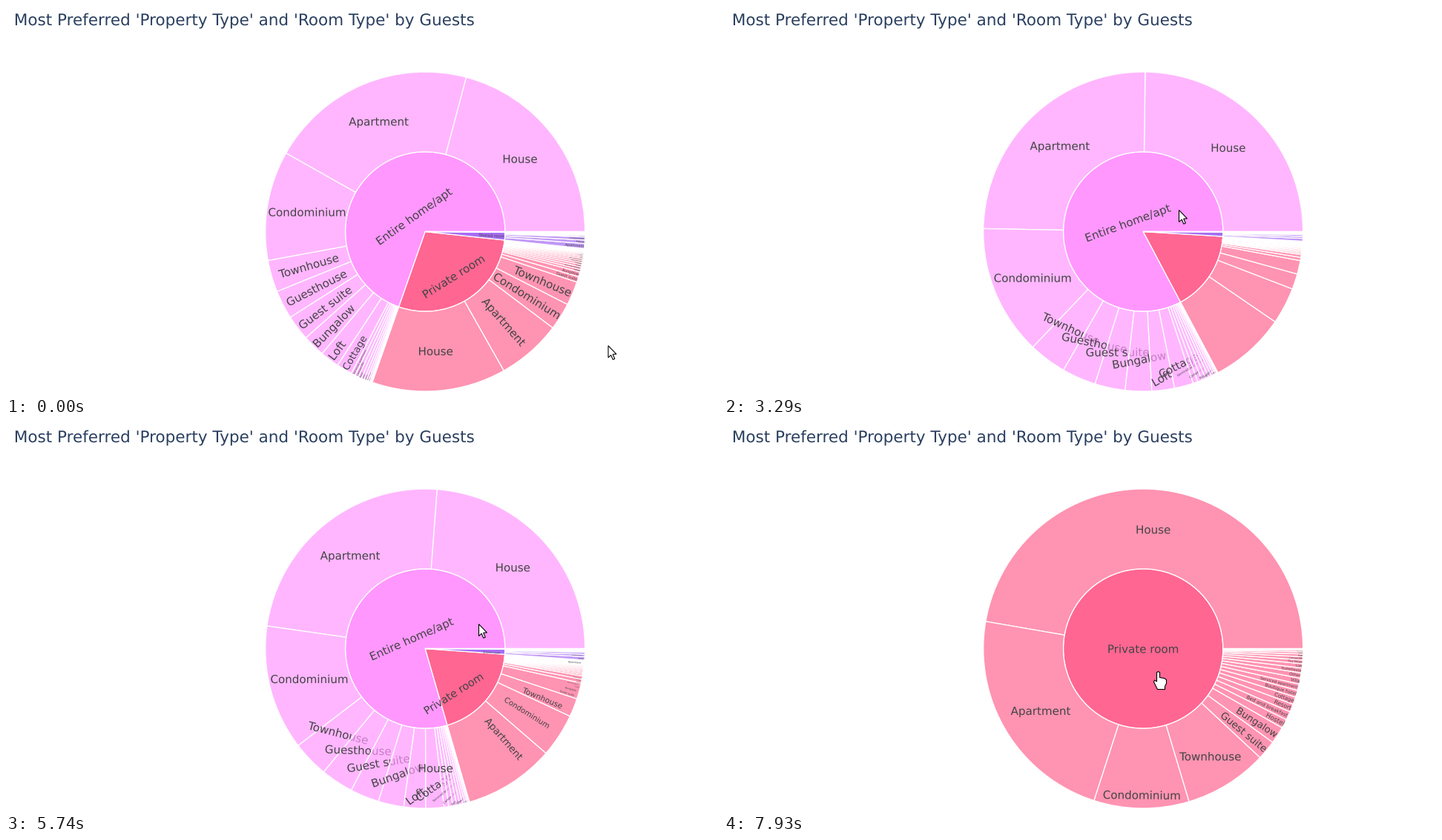
Animation of 960 by 525 pixels, one loop 8000 ms. Source, as a matplotlib script:

```python
import numpy as np
import matplotlib.pyplot as plt
from matplotlib.animation import FuncAnimation
from matplotlib.colors import to_rgba
from matplotlib.patches import Circle, PathPatch, Polygon, Wedge
from matplotlib.textpath import TextPath
from matplotlib.transforms import Affine2D

W, H = 960, 525
STEP, FRAMES = 50, 160
PX = 0.72                      # points per pixel at 100 dpi
CX, CY = 565.2, 304.5
R_IN, R_OUT = 107.7, 215.5
SPIN = 750                     # length of one zoom in ms
PAD = 7.5
LABEL_SIZE, LABEL_H = 15.1, 18.4
DARK = "#444444"
GUESTS = 11924


def ramp(total, n, low=1):
    """Split a total into n parts that fall evenly."""
    parts = np.arange(low + n - 1, low - 1, -1)
    return list(total * parts / parts.sum())


# name, end angle in the overview, colour
ROOTS = [("Entire home/apt", 250.7, "#FF97FF"),
         ("Private room", 353.9, "#FF6692"),
         ("Shared room", 359.5, "#A76CF5"),
         ("Hotel room", 360.0, "#B6E880")]

# leaf names and their shares of the parent in degrees
LEAVES = [
    ("House,Apartment,Condominium,Townhouse,Guesthouse,Guest suite,Bungalow,"
     "Loft,Cottage,Serviced apartment,Camper/RV,Boat,Villa,Other,Tiny house,"
     "Cabin,Resort,Hostel,Bed and breakfast",
     [107.9, 108.3, 57.3] + ramp(74.8, 6, low=5) + ramp(11.7, 10)),
    ("House,Apartment,Condominium,Townhouse,Guest suite,Bungalow,Hostel,"
     "Bed and breakfast,Resort,Cottage,Boutique hotel,Serviced apartment,"
     "Villa,Other,Guesthouse,Loft,Tiny house,Camper/RV,Boat,Cabin,"
     "Farm stay,Hut,Barn",
     [170.2, 81.9, 34.6, 30.3] + ramp(13.3, 2, low=7) + ramp(29.7, 17)),
    ("Apartment,House,Condominium,Townhouse,Guest suite,Hostel,Loft,Other",
     [118, 80, 72] + ramp(90, 5)),
    ("Hostel,Resort,Other", ramp(360, 3)),
]

ALL, ENTIRE, PRIVATE = -1, 0, 1      # views: overview or one root in focus
# click, start of the turn, view before, view after
ZOOMS = [(2820, 2966, ALL, ENTIRE), (5040, 5233, ENTIRE, ALL),
         (6970, 7074, ALL, PRIVATE)]

# start, end and goal of each pointer move
HOME_POS = (812, 458)
MOVES = [(70, 190, 817, 454), (990, 1540, 712, 255), (1940, 2230, 610, 283),
         (2430, 2490, 613.5, 275), (3900, 4240, 650, 235),
         (4500, 4710, 637.5, 271), (5880, 6010, 638, 309),
         (6010, 6310, 585.5, 335)]

ARROW = [(0, 0), (0, 16), (3.7, 12.6), (6.3, 18.7), (8.8, 17.6), (6.2, 11.6),
         (11, 11.4)]
HAND = [(-2, 1), (0, 0), (2, 1), (2, 8), (8, 9), (11, 11), (11, 16), (9, 20),
        (9, 24), (-1, 24), (-6, 14), (-5, 11.5), (-2, 13.5)]

fig = plt.figure(figsize=(W / 100, H / 100), dpi=100, facecolor="white")
ax = fig.add_axes([0, 0, 1, 1])
ax.set_xlim(0, W)
ax.set_ylim(H, 0)
ax.axis("off")


def glyphs(text, size, family="DejaVu Sans"):
    return TextPath((0, 0), text, size=size, prop={"family": family})


def add_text(path, color, x=0, y=0):
    place = Affine2D().scale(1, -1).translate(x, y)
    return ax.add_patch(PathPatch(path, fc=color, lw=0,
                                  transform=place + ax.transData))


def polar(deg, r):
    ang = np.radians(deg)
    return CX + r * np.cos(ang), CY - r * np.sin(ang)


def upright(deg):
    return (deg + 90) % 180 - 90


def inscribed(half, ring):
    """Radius of the largest circle in a slice, relative to its outer radius."""
    if half > np.pi - 1e-3:
        return 1.0
    return min(1 / (1 + 1 / np.sin(half)), ring / 2)


def half_size(aspect, half, ring):
    q = aspect + 1 / (2 * np.tan(half))
    return min(1 / (np.sqrt(q * q + 0.5) + q),
               ring / (np.sqrt(aspect ** 2 + ring / 2) + aspect))


def fit_label(width, lo, hi, r, ring):
    """Angle, scale, distance from the centre and rotation for a label."""
    mid, half = (lo + hi) / 2, np.radians(hi - lo) / 2
    inner = inscribed(half, ring)
    scale = 2 * inner * r / np.hypot(width, LABEL_H)
    if scale >= 1:
        return np.array([mid, scale, (1 - inner) * r, 0])
    options = []
    for long, short, turn in ((LABEL_H, width, 0), (width, LABEL_H, 90)):
        aspect = short / long
        s = half_size(aspect, half, ring)
        options.append((2 * s * (r - PAD) / long,
                        (np.cos(s) - aspect * s) * r, upright(mid - turn)))
    return np.array([mid, *max(options)])


def root_span(k, view):
    if view == ALL:
        return (ROOTS[k - 1][1] if k else 0.0), ROOTS[k][1]
    return (0.0 if k <= view else 360.0), (0.0 if k < view else 360.0)


class Slice:
    def __init__(self, name, root, part, leaf):
        self.name, self.root, self.leaf = name, root, leaf
        self.r, self.ring = (R_OUT, 0.5) if leaf else (R_IN, 1)
        self.wedge = ax.add_patch(Wedge(
            (CX, CY), self.r, 0, 1, width=R_OUT - R_IN if leaf else None,
            fc=to_rgba(ROOTS[root][2], 0.7 if leaf else 1), ec="white",
            lw=1.3 * PX))
        path = glyphs(name, LABEL_SIZE)
        box = path.get_extents()
        self.shift = Affine2D().translate(-(box.x0 + box.x1) / 2,
                                          -0.385 * LABEL_SIZE)
        self.label = add_text(path, DARK)
        self.spans, self.fits = {}, {}
        for view in (ALL, ENTIRE, PRIVATE):
            lo, hi = root_span(root, view)
            span = lo + (hi - lo) * np.array(part) / 360
            self.spans[view] = span
            if hi > lo:
                self.fits[view] = fit_label(box.width, *span, self.r, self.ring)
        lo, hi = self.spans[ALL]
        self.count = round(GUESTS * (hi - lo) / 360)

    def contains(self, deg, dist, view):
        lo, hi = self.spans[view]
        inner = R_IN if self.leaf else 0
        return lo <= deg < hi and inner <= dist < self.r

    def update(self, a, b, p):
        lo, hi = self.spans[a] + (self.spans[b] - self.spans[a]) * p
        self.wedge.set_visible(hi - lo > 1e-4)
        self.wedge.set_theta1(-hi)
        self.wedge.set_theta2(-lo)
        self.place_label(a, b, p)

    def place_label(self, a, b, p):
        self.label.set_visible(False)
        if b not in self.fits:
            return
        new = self.fits[b]
        if a in self.fits:
            old = self.fits[a]
            mid, scale, dist, rot = old + (new - old) * p
            # hold the distance longer near a full circle
            power = 3 if new[2] == 0 else 1 / 3 if old[2] == 0 else 1
            dist = old[2] + (new[2] - old[2]) * p ** power
        else:
            mid, scale, dist, rot = new
            scale *= p
        scale = min(scale, 1)
        if scale * LABEL_SIZE < 1.3:
            return
        place = self.shift + Affine2D().scale(scale, -scale).rotate_deg(
            -rot).translate(*polar(mid, dist))
        self.label.set_transform(place + ax.transData)
        self.label.set_visible(True)


class Hover:
    def __init__(self, piece, view):
        x, y, side = self.anchor(piece, view)
        room, _, color = ROOTS[piece.root]
        parent = room if piece.leaf else ""
        name = f"{parent}/{piece.name}" if parent else piece.name
        lines = [f"labels={piece.name}", f"count={piece.count}",
                 f"parent={parent}", f"id={name}", f"room_type={room}"]
        paths = [glyphs(s, 16.25, "Liberation Sans") for s in lines]
        width = max(p.get_extents().x1 for p in paths) + 9
        near, far = x + 7 * side, x + (7 + width) * side
        shape = [(x, y), (near, y - 7.5), (near, y - 55), (far, y - 55),
                 (far, y + 55), (near, y + 55), (near, y + 7.5)]
        self.parts = [ax.add_patch(Polygon(shape, fc=color, ec=DARK,
                                           lw=1.25 * PX))]
        left = min(near, far) + 4
        for i, path in enumerate(paths):
            self.parts.append(add_text(path, DARK, left, y - 36 + 21.15 * i))

    @staticmethod
    def anchor(piece, view):
        """Side of the inscribed circle, or the rim of a very wide slice."""
        lo, hi = piece.spans[view]
        wide = 180 < hi - lo < 360
        inner = 0 if wide else inscribed(np.radians(hi - lo) / 2, piece.ring)
        mid = (lo + hi) / 2
        side = 1 if np.cos(np.radians(mid)) > 0 else -1
        x, y = polar(mid, (1 - inner) * piece.r)
        return x + side * inner * piece.r, y, side

    def show(self, shown):
        for part in self.parts:
            part.set_visible(shown)


def frame_time(i):
    return i * STEP + 40


def zoom_state(t):
    state = ALL, ALL, 1.0
    for _, start, a, b in ZOOMS:
        if t >= start:
            state = a, b, min((t - start) / SPIN, 1.0)
    return state


def pointer_at(t):
    pos = np.array(HOME_POS, float)
    for start, end, x, y in MOVES:
        p = np.clip((t - start) / (end - start), 0, 1)
        pos += (np.array((x, y)) - pos) * p
    return pos


def slice_under(pos, view):
    dx, dy = pos[0] - CX, CY - pos[1]
    deg, dist = np.degrees(np.arctan2(dy, dx)) % 360, np.hypot(dx, dy)
    for piece in slices:
        if piece.contains(deg, dist, view):
            return piece
    return None


def plan_hovers():
    """Hover box for each frame; a clicked slice is mute until it is left."""
    boxes, plan, muted = {}, [], None
    for i in range(FRAMES):
        t = frame_time(i)
        _, view, p = zoom_state(t)
        piece = slice_under(pointer_at(t), view)
        if p < 1:
            muted = slices[ENTIRE] if view != PRIVATE else slices[PRIVATE]
        elif piece is not muted:
            muted = None
        if p < 1 or piece is None or piece is muted:
            plan.append(None)
            continue
        key = piece, view
        if key not in boxes:
            boxes[key] = Hover(piece, view)
        plan.append(boxes[key])
    return list(boxes.values()), plan


add_text(glyphs("Most Preferred 'Property Type' and 'Room Type' by Guests", 21.52),
         "#2a3f5f", 10.8, 26)

slices = [Slice(root[0], k, (0, 360), False) for k, root in enumerate(ROOTS)]
for k, (names, shares) in enumerate(LEAVES):
    ends = np.cumsum(shares)
    for name, share, end in zip(names.split(","), shares, ends):
        slices.append(Slice(name, k, (end - share, end), True))

hovers, hover_plan = plan_hovers()
pointer = ax.add_patch(Polygon(ARROW, fc="white", ec="black", lw=1.1 * PX))
ring = ax.add_patch(Circle((0, 0), 15.5, fc=(1, 0.86, 0.24, 0.7), lw=0))


def draw(i):
    t = frame_time(i)
    state = zoom_state(t)
    for piece in slices:
        piece.update(*state)
    for hover in hovers:
        hover.show(hover is hover_plan[i])
    pos = pointer_at(t)
    on_root = np.hypot(pos[0] - CX, pos[1] - CY) < R_IN
    shape = HAND if on_root and state[2] == 1 else ARROW
    pointer.set_xy(np.array(shape) + pos + (0, 0.5))
    ring.set_center(pos)
    ring.set_visible(any(click <= t < start for click, start, *_ in ZOOMS))
    return []


anim = FuncAnimation(fig, draw, frames=FRAMES, interval=STEP, repeat=True,
                     repeat_delay=0, blit=False)
plt.show()
```
